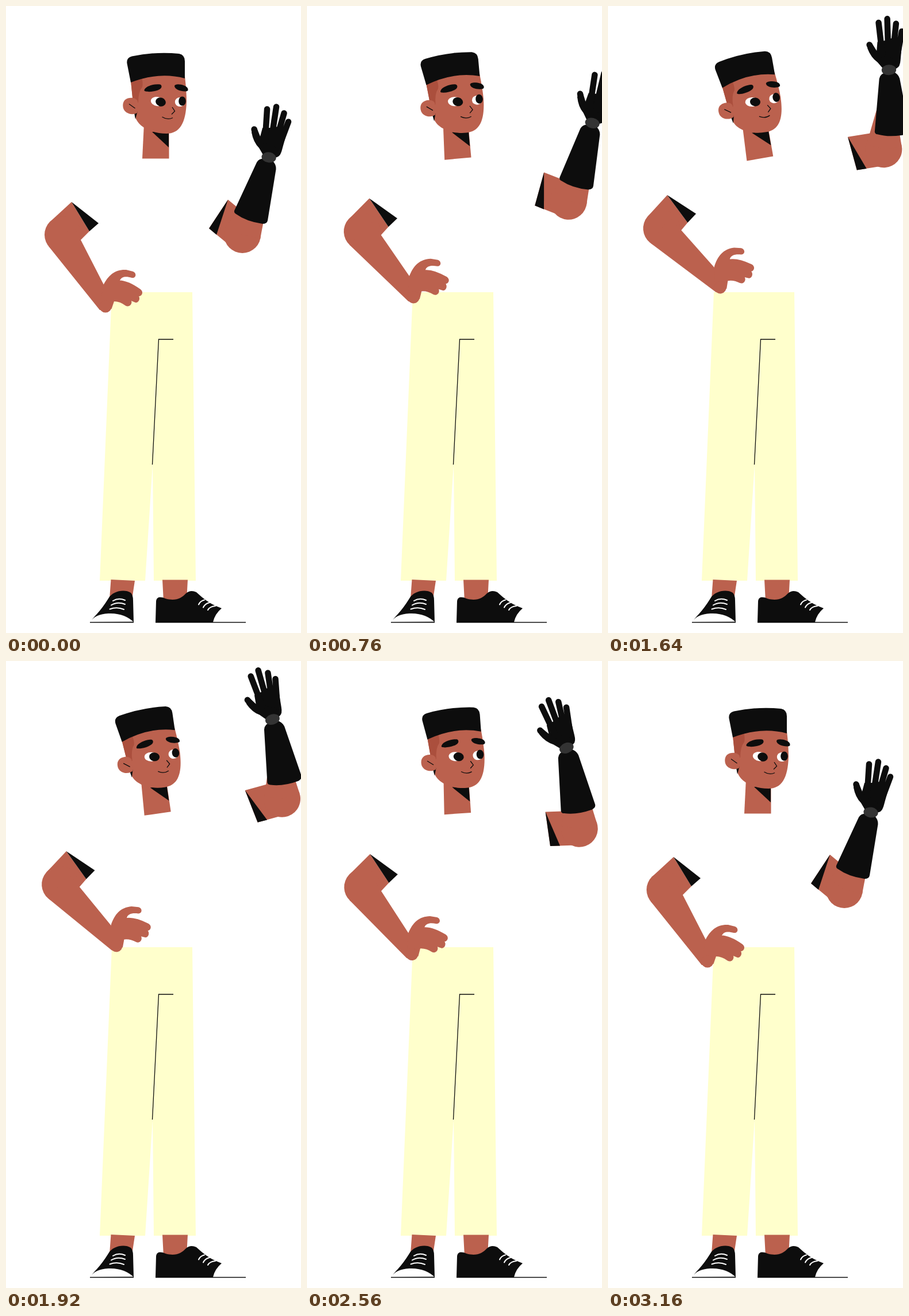
Recreate the animation shown at these times as an HTML page. Size 513 by 1091 pixels, loop 3200 ms.

```html
<!DOCTYPE html>
<html lang="en">
<head>
<meta charset="utf-8">
<title>Waving</title>
<style>
  html, body { margin: 0; width: 100%; height: 100%; overflow: hidden; background: #fff; }
  svg { display: block; width: 100vw; height: 100vh; }
  .skin { fill: #bb614e; }
  .dark { fill: #0d0d0d; }
  .white { fill: #fff; }
  .line { fill: none; stroke: #0d0d0d; stroke-width: 1.3; }
  .lace { fill: none; stroke: #fff; stroke-width: 2; stroke-linecap: round; }
  .finger { fill: none; stroke: #0d0d0d; stroke-width: 10.5; stroke-linecap: round; }
</style>
</head>
<body>
<svg viewBox="0 0 513 1091" preserveAspectRatio="none">
  <g id="legs">
    <path fill="#ffffcc" d="M184 498H324L330 1000H257L255 798L242 1000H163Z"/>
    <path class="line" d="M291 580H265.500L254.500 798"/>
    <path class="skin" d="M182.500 998L224 1000L218 1040L180 1032ZM272 998.500H316L314 1036H274Z"/>
    <path class="dark" d="M178 1031C185 1018 206 1014 217 1021Q221 1025 221 1034L222 1072H148Q149 1067 158 1058Q168 1047 178 1031Z"/>
    <path class="white" d="M147 1072C151 1063 162 1058 178 1057C198 1056 213 1063 221.500 1071.500Z"/>
    <path class="lace" d="M186 1035Q196 1029 207 1034M183 1042.500Q194 1036 207 1041M180.500 1049.500Q193 1045 205 1050"/>
    <path class="dark" d="M260 1072L261 1036C262 1027 270 1028 277 1031C294 1036 305 1031 313 1022Q321 1015 331 1020L340 1028Q355 1041 375 1048Q363 1058 360 1072Z"/>
    <path class="lace" d="M335 1041.500Q338 1035 345 1033.500M343 1046.500Q346 1040 354 1038M351 1051Q354 1045 364 1044"/>
    <path class="line" d="M146 1072.500H222M260 1072.500H417"/>
  </g>

  <g id="head">
    <path class="skin" d="M240 205L237 265.500H283.500V205Z"/>
    <path class="dark" d="M254 219H283V246Z"/>
    <path class="skin" d="M217 130Q266 105 311 122Q314 148 314 166C313 204 302 222 279 222C248 222 225 206 224 188L220 160Z"/>
    <path class="dark" d="M223 186L228.500 184L225 197Z"/>
    <path fill="#ab4f3d" d="M217 130L235 120Q239 134 237 141Q230 149 230 168H221Z"/>
    <path class="dark" d="M217 133L210.500 100Q209 90 219 87.500Q260 79 301 83Q311 85 311 96V126Q266 114 217 133Z"/>
    <path class="skin" d="M229 166C227 160 219 158.500 212 160.500C204 163 202 171 204 178C207 187 219 191 228 186Z"/>
    <path class="line" d="M214 170.500L224.500 178"/>
    <path class="dark" d="M241 145C244 139 258 135 268 136.500C272 138 271 143 267 145C260 149 248 150 243 148.500C240 148 240 147 241 145Z"/>
    <path class="dark" d="M293 139C294 135 304 136 310 138.500C317 141 318 147 315 148C308 150 293 146 293 139Z"/>
    <ellipse class="white" cx="263.500" cy="166" rx="11.700" ry="8" transform="rotate(8 263 166)"/>
    <ellipse class="dark" cx="269" cy="167" rx="9" ry="7.500" transform="rotate(18 269 167)"/>
    <ellipse class="white" cx="302.500" cy="167" rx="8.700" ry="8"/>
    <ellipse class="dark" cx="306.500" cy="165.500" rx="6.300" ry="8"/>
    <path class="line" d="M289 176L293.500 183L288 188.500M271.500 193Q281 199 290 194.500"/>
  </g>

  <g id="upperL">
    <path class="skin" d="M114 341L145 392L120 417L99 398L77 375Z"/>
    <circle class="skin" cx="99" cy="398" r="32"/>
    <path class="dark" d="M114 341L161 378L145 392Z"/>
  </g>
  <path id="foreL" class="skin" d="M74 418L163 529L180 528L173 491L170 485L130 407L118 384L99 398Z"/>
  <g id="handL" class="skin">
    <path d="M169 486C178 468 190 458 209 459L221 462C228 465 226 474 219 473C208 470 201 471 198 477.500Q213 478 234 493C240 498 236 505 231 505C234 510 230 517 225 516L218 513C220 519 214 525 208 521.500Q198 514 188 514L183.500 527L163 527Z"/>
    <circle cx="173" cy="523" r="10.600"/>
  </g>

  <g id="upperR">
    <path class="skin" d="M386 337L353 387L393 420L431 374Z"/>
    <circle class="skin" cx="411" cy="398" r="32"/>
    <path class="dark" d="M386 337L353 387L366 398Z"/>
  </g>
  <path id="foreR" class="skin" d="M385.800 380L440 306L454 325L447 379L442 405L411 398Z"/>
  <path id="cuff" class="dark" d="M397 356L436 272Q441 264 452 266L462 268Q470 275 469.500 284L455 373Q454 379 446 379Q418 375 400 362Q396 360 397 356Z"/>
  <g id="handR">
    <path class="dark" d="M427 220Q430 237 440 247L447 259Q459 268 471 263Q477 262 480 250L486 228L480.500 217L472.500 210L459 212L446 212L442 227L436 212Z"/>
    <path class="finger" d="M431.500 214.500Q434 228 441 237M454 179.500L450.500 235M470 175.500L461 235M483.500 186.500L468 240M491 201.500L474 247"/>
    <ellipse fill="#333" cx="457" cy="263.500" rx="12.700" ry="9" transform="rotate(8 457 263.500)"/>
  </g>
</svg>
<script>
const LOOP = 3200, END = 3160, HALF = END / 2;
const $ = id => document.getElementById(id);

// Linear interpolation over [time, value] keys
function track(t, keys) {
  let i = 1;
  while (i < keys.length - 1 && t > keys[i][0]) i++;
  const [t0, a] = keys[i - 1], [t1, b] = keys[i];
  return a + (b - a) * Math.min(1, Math.max(0, (t - t0) / (t1 - t0)));
}

// Triangle wave with a slightly rounded tip
function swayAt(t) {
  const tip = 0.06;
  return 1.033 * (Math.hypot(1, tip) - Math.hypot((t - HALF) / HALF, tip));
}

// Rigid move: joint "from" lands on "to", turned by deg
function place(ids, from, to, deg) {
  const tf = `translate(${to}) rotate(${deg}) translate(${-from[0]},${-from[1]})`;
  for (const id of ids) $(id).setAttribute('transform', tf);
  const r = deg * Math.PI / 180, c = Math.cos(r), s = Math.sin(r);
  return ([x, y]) => {
    const dx = x - from[0], dy = y - from[1];
    return [to[0] + dx * c - dy * s, to[1] + dx * s + dy * c];
  };
}

const NECK = [262, 242], CHEST = [249.6, 231];
const LEFT = { shoulder: [114, 341], elbow: [99, 398], wrist: [173, 513] };
const RIGHT = { shoulder: [322, 287], elbow: [411, 398], wrist: [457, 263.5] };

const WAVE = [[0, 0], [1320, 0], [2270, -40.5], [END, 0]];
const FORE = [[0, 0], [1320, -3.4], [1640, -20], [2270, -38.6], [2560, -28], [END, 0]];
const HAND = [[0, 0], [1320, 8.5], [1640, -10.2], [2270, -42.5], [2560, -29], [END, 0]];
const SLIP = [[0, 0], [1320, 0], [1640, 1], [2270, 0], [END, 0]];

function draw(t) {
  const sway = swayAt(t);

  place(['head'], NECK, NECK, -10.35 * sway);

  const { shoulder, elbow, wrist } = LEFT;
  const upper = place(['upperL'], shoulder,
    [shoulder[0] - 11.4 * sway, shoulder[1] - 12.6 * sway], -5.3 * sway);
  const fore = place(['foreL'], elbow, upper(elbow), -15 * sway);
  place(['handL'], wrist, fore(wrist), -10.6 * sway);

  const lift = -36.4 * sway, slip = track(t, SLIP), bend = track(t, FORE);
  const [sx, sy] = place([], CHEST, CHEST, lift)(RIGHT.shoulder);
  const arm = place(['upperR'], RIGHT.shoulder,
    [sx - 3.8 * slip, sy + 7.5 * slip], lift + track(t, WAVE));
  const [ex, ey] = arm(RIGHT.elbow);
  place(['foreR'], RIGHT.elbow, [ex, ey], bend);
  const cuff = place(['cuff'], RIGHT.elbow, [ex + 12 * slip, ey + 4 * slip], bend);
  place(['handR'], RIGHT.wrist, cuff(RIGHT.wrist), track(t, HAND));
}

const start = performance.now();
function tick() {
  draw(Math.min((performance.now() - start) % LOOP, END));
  requestAnimationFrame(tick);
}
tick();
</script>
</body>
</html>
```
